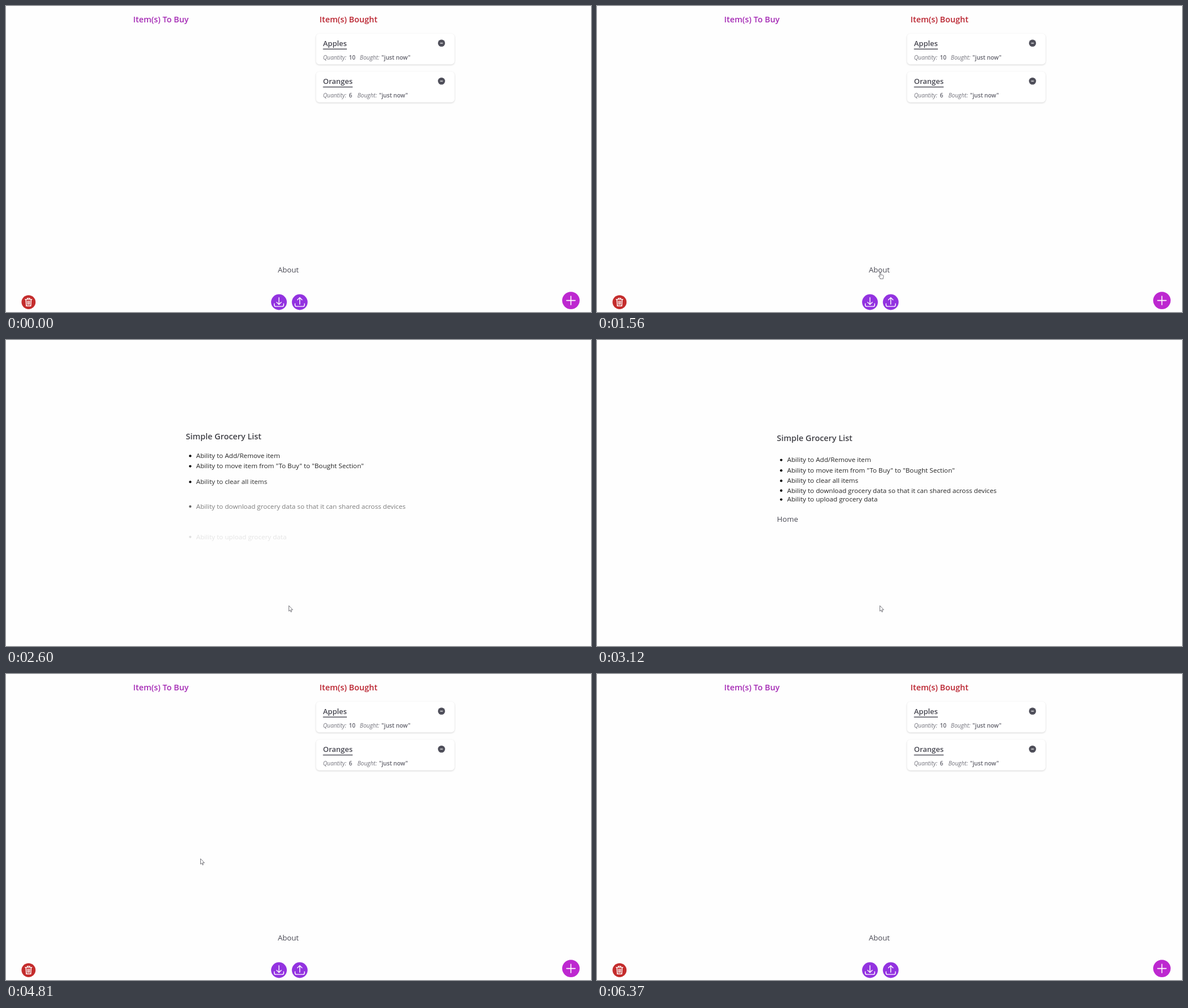
An HTML page with a canvas that plays this animation: 1033 by 542 pixels, repeating every 6.5 s.

```html
<!DOCTYPE html>
<html lang="en">
<head>
<meta charset="utf-8">
<title>Simple Grocery List</title>
<style>
  html, body { margin: 0; width: 100%; height: 100%; overflow: hidden; background: #fefefe; }
  canvas { display: block; width: 1033px; height: 542px; }
</style>
</head>
<body>
<canvas id="stage"></canvas>
<script>
const W = 1033, H = 542, LOOP = 6500, STEP = 130;
const ABOUT_AT = 1990, HOME_AT = 4420;
const FONT = '"Open Sans", "Noto Sans", sans-serif';
const INK = '#474751', MUTED = '#73737c';

const canvas = document.getElementById('stage');
const ctx = canvas.getContext('2d');
const ratio = window.devicePixelRatio || 1;
canvas.width = Math.round(W * ratio);
canvas.height = Math.round(H * ratio);

const clamp = v => Math.min(1, Math.max(0, v));
const smooth = v => v * v * (3 - 2 * v);

function text(str, x, y, size, color, style = '400') {
  ctx.font = `${style} ${size}px ${FONT}`;
  ctx.fillStyle = color;
  ctx.fillText(str, x, y);
  return ctx.measureText(str).width;
}

function rect(x, y, w, h, color) {
  ctx.fillStyle = color;
  ctx.fillRect(x, y, w, h);
}

function disc(x, y, r, color) {
  ctx.fillStyle = color;
  ctx.beginPath();
  ctx.arc(x, y, r, 0, Math.PI * 2);
  ctx.fill();
}

function stroke(path, color, width) {
  ctx.strokeStyle = color;
  ctx.lineWidth = width;
  ctx.lineCap = ctx.lineJoin = 'round';
  ctx.stroke(new Path2D(path));
}

function at(x, y, draw) {
  ctx.save();
  ctx.translate(x, y);
  draw();
  ctx.restore();
}

function link(label, x, y, hovered) {
  const w = text(label, x, y, 13.15, INK);
  if (hovered) rect(x, y + 5, w, 1.4, '#6b6b76');
}

// Home page

function card(y, name, quantity, boughtX) {
  ctx.save();
  ctx.shadowColor = 'rgba(0,0,0,.17)';
  ctx.shadowBlur = 3 * ratio;
  ctx.shadowOffsetY = ratio;
  ctx.fillStyle = '#fff';
  ctx.beginPath();
  ctx.roundRect(547.5, y, 244.5, 54.5, 6);
  ctx.fill();
  ctx.restore();

  const w = text(name, 559.7, y + 22, 13, INK, '600');
  rect(559.7, y + 26.6, w, 1.4, INK);
  text('Quantity:', 559.7, y + 46, 10.2, MUTED, 'italic 400');
  text(quantity, 605.5, y + 46, 10, '#62626c', '600');
  text('Bought:', boughtX, y + 46, 10.2, MUTED, 'italic 400');
  text('"just now"', boughtX + 38.3, y + 46, 10.2, '#62626c', '600');
  disc(769, y + 16.8, 6.3, '#50505b');
  rect(766.6, y + 16.2, 4.8, 1.2, '#fff');
}

function trashButton() {
  disc(0, 0, 12.4, '#c42d2d');
  stroke('M-6 -5H6M-2.2 -5.4V-7H2.2V-5.4', '#fff', 1.4);
  stroke('M-4.6 -4.4L-3.9 6.6H3.9L4.6 -4.4', '#fff', 1.5);
  stroke('M-1.9 -2.2L-1.6 4.2M0 -2.2V4.2M1.9 -2.2L1.6 4.2', '#fff', 1.1);
}

function transferButton(arrow) {
  disc(0, 0, 13.9, '#9333e0');
  stroke('M-8.3 2.6V5.2Q-8.3 7.6 -5.9 7.6H5.9Q8.3 7.6 8.3 5.2V2.6', '#fff', 1.4);
  stroke(arrow, '#fff', 1.4);
}

function addButton() {
  disc(0, 0, 15.4, '#bd28d0');
  stroke('M-7.6 0H7.6M0 -7.6V7.6', '#fff', 1.6);
}

function homePage(t) {
  text('Item(s) To Buy', 224.6, 29.3, 14.4, '#a52bb5', '600');
  text('Item(s) Bought', 553.6, 29.3, 14.4, '#ba2430', '600');
  card(49, 'Apples', '10', 624.8);
  card(116.2, 'Oranges', '6', 620.4);
  link('About', 480, 472.3, t >= 1690 && t < ABOUT_AT);
  at(39.8, 524.6, trashButton);
  at(482, 524.5, () => transferButton('M0 -8V4M-4.1 0.2L0 4.2L4.1 0.2'));
  at(518.7, 524.5, () => transferButton('M0 3.8V-8M-4.1 -4L0 -8L4.1 -4'));
  at(997.5, 521.6, addButton);
}

// About page

const features = [
  'Ability to Add/Remove item',
  'Ability to move item from "To Buy" to "Bought Section"',
  'Ability to clear all items',
  'Ability to download grocery data so that it can shared across devices',
  'Ability to upload grocery data'
];

// Remaining share of the distance of an underdamped spring.
function spring(seconds) {
  const phase = 7.4 * seconds, decay = 0.75;
  return Math.exp(-decay * phase) * (Math.cos(phase) + decay * Math.sin(phase));
}

function fade(seconds) {
  const v = clamp(seconds / 0.33);
  return v < 0.5 ? 2 * v * v : 1 - 2 * (1 - v) ** 2;
}

function springIn(t, order, draw) {
  const age = (t - 2018 - order * 100) / 1000;
  if (age <= 0) return;
  ctx.globalAlpha = fade(age);
  at(0, 80 * spring(age), draw);
  ctx.globalAlpha = 1;
}

function aboutPage(t) {
  springIn(t, 0, () => text('Simple Grocery List', 317.6, 179, 14.4, '#414147', '600'));
  features.forEach((feature, i) => springIn(t, i + 1, () => {
    const y = 216 + i * 18.3;
    disc(325.3, y - 3.8, 2.15, '#000');
    text(feature, 335.8, y, 11.68, '#262626');
  }));
  springIn(t, 6, () => link('Home', 317.8, 327.8, t >= 3900));
}

// Pointer

const pointerPath = [
  [1040, 640, 556], [1430, 499.5, 471], [3510, 499.5, 471], [3640, 541, 344],
  [3900, 343.5, 327.5], [5460, 343.5, 327.5], [5850, 300, -20]
];

function pointerAt(t) {
  const next = pointerPath.findIndex(p => p[0] > t);
  if (next < 1) return pointerPath.at(next).slice(1);
  const [t0, x0, y0] = pointerPath[next - 1];
  const [t1, x1, y1] = pointerPath[next];
  const k = smooth((t - t0) / (t1 - t0));
  return [x0 + (x1 - x0) * k, y0 + (y1 - y0) * k];
}

const arrowShape = 'M0 0V9.3L2.1 7.4L3.6 10.8L5 10.2L3.6 6.9H6.5Z';
const handShape = 'M0 1.2Q0.8 0.2 1.6 1.2V5L5.3 5.7Q6.6 6 6.5 7.4L5.8 10.6V12.2H0.5V11L-2.4 7.6Q-2.2 6.4 -1 7L0 7.9Z';

function pointer(t) {
  const hand = (t >= 1430 && t < ABOUT_AT) || (t >= 3900 && t < HOME_AT);
  const shape = hand ? handShape : arrowShape;
  const [x, y] = pointerAt(t);
  at(x, y, () => {
    ctx.fillStyle = '#fff';
    ctx.fill(new Path2D(shape));
    stroke(shape, '#55555c', 0.8);
  });
}

function render(t) {
  ctx.setTransform(ratio, 0, 0, ratio, 0, 0);
  rect(0, 0, W, H, '#fefefe');
  if (t >= ABOUT_AT && t < HOME_AT) aboutPage(t);
  else homePage(t);
  pointer(t);
}

let start;
function tick(now) {
  start ??= now;
  const t = (now - start) % LOOP;
  render(Math.floor(t / STEP) * STEP);
  requestAnimationFrame(tick);
}
requestAnimationFrame(tick);
</script>
</body>
</html>
```
